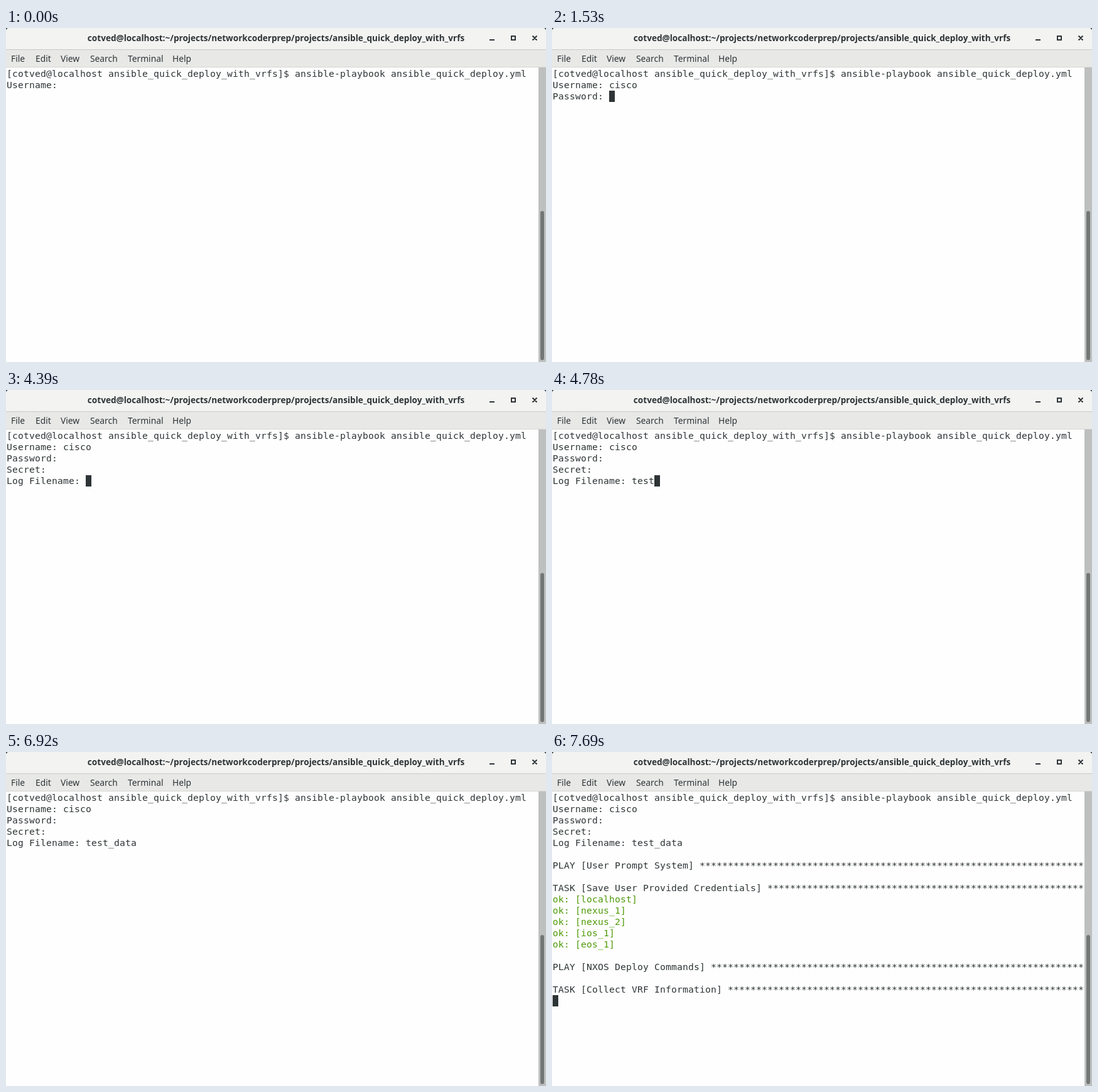
An HTML page that plays this animation: 860 px wide and 533 px high, repeating every 8 s.

```html
<!DOCTYPE html>
<html lang="en">
<head>
<meta charset="utf-8">
<title>Terminal</title>
<style>
  html, body { margin: 0; width: 100%; height: 100%; overflow: hidden; background: #34474b; }
  #window { position: relative; width: 860px; height: 533px; overflow: hidden; background: #fefefe;
    border-radius: 5px 5px 0 0; color: #2e3436; }
  #window > * { position: absolute; margin: 0; white-space: pre; }
  #title { left: 0; top: 0; width: 860px; height: 34px; background: #f3f3f2; border-bottom: 1px solid #c9cac8;
    font: bold 13.6px/32px "Noto Sans", "Open Sans", sans-serif; text-align: center; }
  #menu { left: 0; top: 35px; width: 860px; height: 27px; background: #e8e8e7; border-bottom: 1px solid #d5d6d4;
    font: 13.8px/28px "Noto Sans", "Open Sans", sans-serif; }
  #menu span { position: absolute; top: 0; }
  #buttons { left: 0; top: 0; fill: none; stroke: #2e3436; stroke-width: 2; }
  #track { left: 848px; top: 63px; width: 12px; height: 470px; background: #bec0bf; }
  #thumb { left: 851px; top: 292px; width: 6px; height: 238px; border-radius: 3px; background: #737776; }
  #screen { left: 1px; top: 64px; font: 14.667px/18px "DejaVu Sans Mono", monospace;
    letter-spacing: calc(9px - 1ch); }
  #screen .ok { color: #4e9a06; }
  #cursor { width: 9px; height: 18px; background: #2e3436; }
</style>
</head>
<body>
<div id="window">
  <div id="title">cotved@localhost:~/projects/networkcoderprep/projects/ansible_quick_deploy_with_vrfs</div>
  <div id="menu"><span style="left:8px">File</span><span style="left:47px">Edit</span><span style="left:87px">View</span><span style="left:134px">Search</span><span style="left:194px">Terminal</span><span style="left:265px">Help</span></div>
  <svg id="buttons" width="860" height="34">
    <path d="M770 19h8M805 13h6v6h-6zM838.5 12.5l7 7M845.5 12.5l-7 7"/>
  </svg>
  <div id="track"></div>
  <div id="thumb"></div>
  <pre id="screen"></pre>
  <div id="cursor"></div>
</div>
<script>
const LOOP = 8000, COLUMNS = 94, CELL_W = 9, CELL_H = 18;
const screenEl = document.getElementById('screen');
const cursorEl = document.getElementById('cursor');

const banner = text => '\n' + (text + ' ').padEnd(COLUMNS, '*') + '\n';
const user = '[cotved@localhost ansible_quick_deploy_with_vrfs]$ ansible-playbook ansible_quick_deploy.yml\nUsername: ';
const password = user + 'cisco\nPassword: ';
const secret = password + '\nSecret: ';
const log = secret + '\nLog Filename: ';
const play = log + 'test_data\n' + banner('PLAY [User Prompt System]') +
  banner('TASK [Save User Provided Credentials]');
const deploy = play +
  ['localhost', 'nexus_1', 'nexus_2', 'ios_1', 'eos_1'].map(host => `ok: [${host}]\n`).join('') +
  banner('PLAY [NXOS Deploy Commands]') + banner('TASK [Collect VRF Information]');

// [start time, text, cursor hidden]
const steps = [
  [0, user, true],
  [560, user],
  [680, user + 'c'],
  [830, user + 'cis'],
  [980, user + 'cisc'],
  [1100, user + 'cisco'],
  [1530, password],
  [2340, secret],
  [3180, log],
  [3770, log, true],
  [4390, log],
  [4540, log + 't'],
  [4660, log + 'te'],
  [4780, log + 'test'],
  [5030, log + 'test_'],
  [5590, log + 'test_', true],
  [5990, log + 'test_d'],
  [6110, log + 'test_da'],
  [6390, log + 'test_data'],
  [6920, log + 'test_data', true],
  [7440, play],
  [7690, deploy]
];

let shown;
function draw(now) {
  const time = now % LOOP;
  const step = steps.findLast(([start]) => start <= time);
  if (step !== shown) {
    shown = step;
    const [, text, hidden] = step;
    const lines = text.split('\n');
    screenEl.innerHTML = text.replace(/^ok:.*$/gm, '<span class="ok">$&</span>');
    cursorEl.style.left = 1 + lines.at(-1).length * CELL_W + 'px';
    cursorEl.style.top = 64 + (lines.length - 1) * CELL_H + 'px';
    cursorEl.hidden = !!hidden;
  }
  requestAnimationFrame(draw);
}
draw(0);
</script>
</body>
</html>
```
